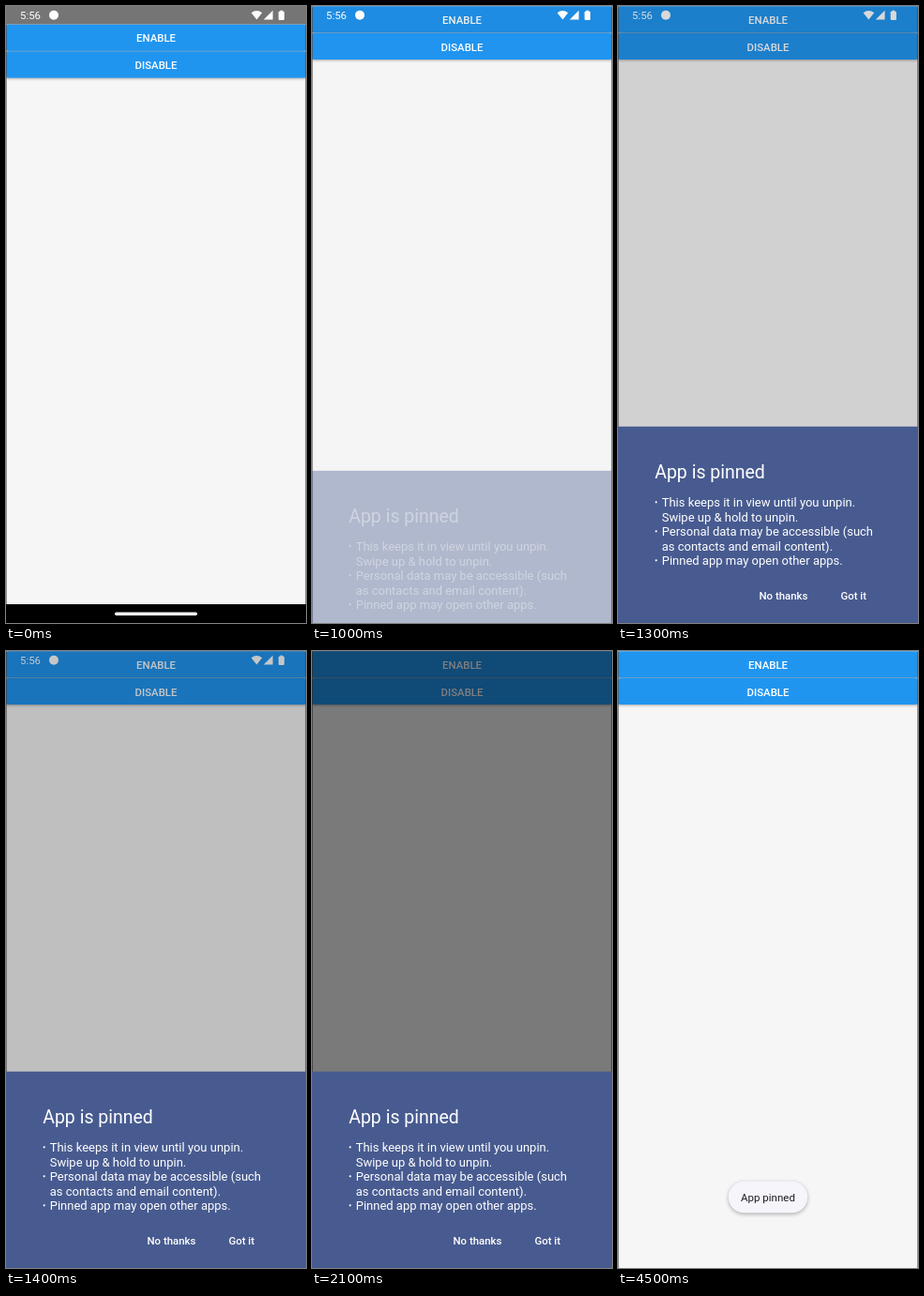
Animation, 320 px wide and 657 px high, one loop 8000 ms. Source, as an HTML page with a canvas:

```html
<!DOCTYPE html>
<html lang="en">
<head>
<meta charset="utf-8">
<title>App pinning</title>
<style>
html, body { margin: 0; width: 100%; height: 100%; overflow: hidden; background: #f6f6f6; }
canvas { display: block; width: 320px; height: 657px; }
</style>
</head>
<body>
<canvas id="stage"></canvas>
<script>
const W = 320, H = 657, LOOP = 8000, STEP = 100;
const BAR = 19.4, ROW = 28.7;
const canvas = document.getElementById('stage');
const ctx = canvas.getContext('2d');
const dpr = window.devicePixelRatio || 1;
canvas.width = Math.round(W * dpr);
canvas.height = Math.round(H * dpr);

const clamp = v => Math.min(1, Math.max(0, v));
const span = (t, from, length) => clamp((t - from) / length);
const decelerate = f => 1 - (1 - f) ** 2;
const easeInOut = f => (1 - Math.cos(Math.PI * f)) / 2;
// cubic-bezier(0, 0, 0, 1) in closed form
const settle = f => { const s = Math.cbrt(f); return s * s * (3 - 2 * s); };

function rect(x, y, w, h, fill) {
  ctx.fillStyle = fill;
  ctx.fillRect(x, y, w, h);
}

function pill(x, y, w, h, r, fill) {
  ctx.fillStyle = fill;
  ctx.beginPath();
  ctx.roundRect(x, y, w, h, r);
  ctx.fill();
}

function disc(x, y, r, fill) {
  ctx.fillStyle = fill;
  ctx.beginPath();
  ctx.arc(x, y, r, 0, 2 * Math.PI);
  ctx.fill();
}

function text(str, x, y, size, { weight = 400, align = 'left', fill = '#fff' } = {}) {
  ctx.font = `${weight} ${size}px Roboto, sans-serif`;
  ctx.textAlign = align;
  ctx.fillStyle = fill;
  ctx.fillText(str, x, y);
}

function layer(alpha, draw) {
  if (alpha <= 0) return;
  ctx.save();
  ctx.globalAlpha = alpha;
  draw();
  ctx.restore();
}

function shadow(blur, dy, color) {
  ctx.shadowColor = color;
  ctx.shadowBlur = blur * dpr;
  ctx.shadowOffsetY = dy * dpr;
}

function button(label, y) {
  layer(1, () => {
    shadow(3, 1, 'rgba(0,0,0,.32)');
    pill(0.4, y + 0.2, W - 0.8, ROW - 0.5, 1.5, '#2095f0');
  });
  text(label, W / 2, y + 19, 11.4, { weight: 500, align: 'center' });
}

function ripple(t, y) {
  if (t < 500 || t >= 1300) return;
  const alpha = t < 700 ? 0.12 : 0.11 * (1 - span(t, 700, 600));
  layer(alpha, () => {
    ctx.beginPath();
    ctx.rect(0, y, W, ROW - 0.4);
    ctx.clip();
    disc(W / 2, y + ROW / 2, 70 + 100 * span(t, 500, 100), '#000');
  });
}

function statusIcons() {
  text('5:56', 15, 14.2, 11.4);
  disc(51, 9.8, 5, '#fff');
  ctx.beginPath();
  ctx.moveTo(267.4, 14.6);
  ctx.lineTo(261.6, 7.3);
  ctx.quadraticCurveTo(267.4, 2.9, 273.2, 7.3);
  ctx.closePath();
  ctx.moveTo(284.6, 4.8);
  ctx.lineTo(284.6, 14.6);
  ctx.lineTo(274.8, 14.6);
  ctx.closePath();
  ctx.fill();
  pill(290.7, 5.7, 6.2, 9.2, 0.8, '#fff');
  rect(292.4, 4.7, 2.8, 1.5, '#fff');
}

const handle = () => pill(116, 645.5, 88, 3.4, 1.7, '#fff');

function app(t) {
  const framed = t < 700;
  const top = framed ? BAR : 0;
  rect(0, 0, W, H, '#f6f6f6');
  button('ENABLE', top);
  button('DISABLE', top + ROW);
  ripple(t, top);
  rect(0, 0, 0.6, H, 'rgba(0,0,0,.65)');
  rect(W - 0.6, 0, 0.6, H, 'rgba(0,0,0,.65)');
  if (framed) {
    rect(0, 0, W, BAR, '#757575');
    rect(0, 637, W, 20, '#000');
  }
  if (t < 4200) layer(1 - span(t, 1700, 400), statusIcons);
  layer(framed ? 0.95 : 0.9 * (1 - span(t, 700, 300)), handle);
}

const NOTES = [
  ['This keeps it in view until you unpin.', true],
  ['Swipe up & hold to unpin.', false],
  ['Personal data may be accessible (such', true],
  ['as contacts and email content).', false],
  ['Pinned app may open other apps.', true]
];

function pinDialog(t) {
  if (t < 933 || t >= 4200) return;
  rect(0, 0, W, H, `rgba(0,0,0,${0.5 * easeInOut(span(t, 933, 1000))})`);
  const shown = decelerate(span(t, 933, 300));
  layer(shown, () => {
    ctx.translate(0, 78 * (1 - shown));
    rect(0, 447.8, W, H - 447.8, '#485b90');
    text('App is pinned', 39.2, 503.3, 19.5);
    NOTES.forEach(([line, bullet], i) => {
      const y = 533 + i * 15.5;
      if (bullet) disc(40.7, y - 4.7, 1.1, '#fff');
      text(line, 46.7, y, 13);
    });
    text('No thanks', 150.5, 632.3, 11.4, { weight: 500 });
    text('Got it', 237.4, 632.3, 11.4, { weight: 500 });
  });
}

function toast(t) {
  const age = t - 4200;
  if (age <= 0) return;
  const scale = 0.9 + 0.1 * settle(span(age, 0, 300));
  layer(span(age, 0, 66), () => {
    ctx.translate(160, 581.5);
    ctx.scale(scale, scale);
    layer(1, () => {
      shadow(4, 1.5, 'rgba(0,0,0,.3)');
      pill(-42.2, -16.8, 84.4, 33.6, 16.8, '#f5f5fb');
    });
    layer(span(age, 50, 250), () =>
      text('App pinned', 0, 4.1, 11.5, { align: 'center', fill: '#1c1c20' }));
  });
}

function draw(t) {
  ctx.setTransform(dpr, 0, 0, dpr, 0, 0);
  app(t);
  pinDialog(t);
  toast(t);
}

const start = performance.now();
function tick() {
  const t = (performance.now() - start) % LOOP;
  draw(Math.floor(t / STEP) * STEP);
  requestAnimationFrame(tick);
}
tick();
</script>
</body>
</html>
```
